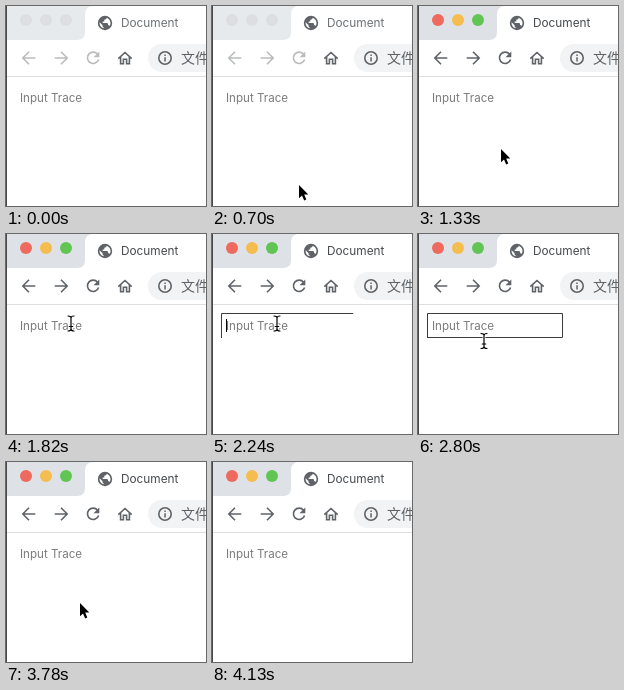
An HTML page that plays this animation: 200 by 200 pixels, repeating every 4550 ms.

```html
<!DOCTYPE html>
<html lang="en">
<head>
<meta charset="utf-8">
<title>Input Trace</title>
<style>
  html, body { margin: 0; width: 100%; height: 100%; overflow: hidden; background: #fff; }
  svg { display: block; width: 100vw; height: 100vh; }
  text { font-family: Inter, Roboto, "Liberation Sans", sans-serif; }
  .cjk { font-family: "Noto Sans CJK SC", "Noto Sans CJK", sans-serif; }
  svg { --strip: #dee1e6; --red: #ee6a5f; --yellow: #f5bd4f; --green: #61c554; --icon: #5f6368; --title: #45494d; }
  svg.idle { --strip: #e7eaed; --red: #dcdee1; --yellow: #dcdee1; --green: #dcdee1; --icon: #babcbe; --title: #6c7074; }
  .line { fill: none; stroke: var(--icon); stroke-width: 1.6; }
  .dark { fill: none; stroke: #5f6368; stroke-width: 1.6; }
</style>
</head>
<body>
<svg id="stage" class="idle" viewBox="0 0 200 200">
  <rect width="200" height="200" fill="#fff"/>

  <!-- tab strip -->
  <path d="M0 0H85Q79 2 79 8V26Q79 34 71 34H0Z" fill="var(--strip)"/>
  <circle cx="20" cy="14" r="6" fill="var(--red)"/>
  <circle cx="40" cy="14" r="6" fill="var(--yellow)"/>
  <circle cx="60" cy="14" r="6" fill="var(--green)"/>
  <circle cx="99" cy="17" r="7.2" fill="#5f6368"/>
  <path d="M93.6 16.3L96.6 19.2V20.6L98.3 22.3C95.400 22.200 93.300 19.600 93.600 16.300ZM100.600 11.800C100.600 13.400 99.500 13.700 98.300 13.800V15.400H96.700V17H101.200Q102.200 17.200 102.200 19.300H103.300L103.600 20.200C105.500 17.400 104.400 13.300 100.600 11.800Z" fill="#fff"/>
  <text x="115" y="21" font-size="11.8" fill="var(--title)">Document</text>

  <!-- toolbar -->
  <path class="line" d="M29.300 52H17M23 45.800L16.800 52L23 58.200"/>
  <path class="line" d="M48.700 52H61M55 45.800L61.200 52L55 58.200"/>
  <path class="line" d="M91.600 48.200A5.700 5.700 0 1 0 92.600 53.500"/>
  <path d="M93.300 45.500V51.300H87.500Z" fill="var(--icon)"/>
  <path class="dark" d="M112.300 52.600L119 46.500L125.700 52.600M114.600 51V57.700H117.400V53.300H120.600V57.700H123.400V51"/>
  <rect x="142" y="38" width="90" height="28" rx="14" fill="#f1f3f4"/>
  <circle class="dark" cx="159" cy="52" r="6.200" stroke-width="1.400"/>
  <path d="M158.300 48.500H159.800V50H158.300ZM158.300 51.300H159.800V55.500H158.300Z" fill="#5f6368"/>
  <text class="cjk" x="175" y="57.200" font-size="14" fill="#5f6368">文件</text>
  <rect y="70" width="200" height="1" fill="#dcdee1"/>

  <!-- page -->
  <text x="14" y="96" font-size="11.6" fill="#7b7b7b">Input Trace</text>
  <rect id="caret" x="14" y="85" width="1" height="13" fill="#000"/>
  <path id="trace" d="M9.500 104V79.500H144.500V103.500H10" fill="none" stroke="#3c3c3c"/>
  <rect width="1" height="200" fill="#4a4a4a"/>

  <circle id="ring" fill="none" stroke="#000" stroke-width="1.500"/>
  <path id="arrow" d="M0 0V13.200L3 10.400L5.200 15.400L7.300 14.500L5.200 9.600H9.300Z" fill="#000" stroke="#fff" stroke-width="1.800" stroke-linejoin="round" paint-order="stroke"/>
  <g id="beam" fill="none" stroke-linecap="round">
    <path d="M-3 -7.500Q0 -7.500 0 -5.500Q0 -7.500 3 -7.500M0 -5.500V5.500M-3 7.500Q0 7.500 0 5.500Q0 7.500 3 7.500M-1.800 3H1.800" stroke="#fff" stroke-width="2.800"/>
    <path d="M-3 -7.500Q0 -7.500 0 -5.500Q0 -7.500 3 -7.500M0 -5.500V5.500M-3 7.500Q0 7.500 0 5.500Q0 7.500 3 7.500M-1.800 3H1.800" stroke="#000" stroke-width="1.200"/>
  </g>
</svg>
<script>
const LOOP = 4550, STEP = 70, SIDE_MS = 100;
const $ = id => document.getElementById(id);
const stage = $('stage'), trace = $('trace'), ring = $('ring');

// [time, pointer, x, y]
const moves = [
  [0, ''],
  [700, 'arrow', 87, 179], [770, 'arrow', 85, 165], [840, 'arrow', 84, 160],
  [1330, 'arrow', 83, 143], [1400, 'arrow', 80, 131], [1470, 'arrow', 77, 119],
  [1540, 'arrow', 73, 109], [1610, 'beam', 70, 101], [1680, 'beam', 67, 95],
  [1750, 'beam', 66, 91], [1820, 'beam', 65, 89.5],
  [2800, 'beam', 66, 107], [2870, 'arrow', 70, 124], [2940, 'arrow', 72, 135],
  [3780, 'arrow', 74, 141], [3850, 'arrow', 81, 158], [3920, 'arrow', 91, 181],
  [3990, 'arrow', 100, 198], [4130, '']
];
// [time, x, y, radius]
const clicks = [[910, 83.5, 159.5, 21.2], [2030, 65, 89.5, 16.7], [3010, 72, 134.8, 16.5]];
const sides = [24.5, 135, 24, 134.5];
const total = sides.reduce((a, b) => a + b);
trace.style.strokeDasharray = `${total} ${total + 10}`;

const clamp = v => Math.min(1, Math.max(0, v));
const bez = (a, b, u) => 3 * a * u * (1 - u) ** 2 + 3 * b * u * u * (1 - u) + u ** 3;

function ease(p) {
  if (p <= 0 || p >= 1) return clamp(p);
  let lo = 0, hi = 1;
  for (let i = 0; i < 20; i++) {
    const mid = (lo + hi) / 2;
    if (bez(0.25, 0.25, mid) < p) lo = mid; else hi = mid;
  }
  return bez(0.1, 1, lo);
}

// Sides grow one after another and retract in the opposite order.
function traced(t) {
  return sides.reduce((sum, len, i) => {
    const grow = ease((t - 2060 - i * SIDE_MS) / SIDE_MS);
    const shrink = ease((t - 3043 - (3 - i) * SIDE_MS) / SIDE_MS);
    return sum + len * (grow - shrink);
  }, 0);
}

const show = (el, on) => { el.style.display = on ? '' : 'none'; };

function draw(time) {
  const t = Math.floor((time % LOOP) / STEP + 1e-6) * STEP;
  stage.classList.toggle('idle', t < 980);

  const [, kind, x, y] = moves.filter(m => m[0] <= t).pop();
  for (const id of ['arrow', 'beam']) {
    show($(id), id === kind);
    if (id === kind) $(id).setAttribute('transform', `translate(${x} ${y})`);
  }

  const click = clicks.find(c => c[0] === t);
  show(ring, click);
  if (click) ['cx', 'cy', 'r'].forEach((k, i) => ring.setAttribute(k, click[i + 1]));

  show($('caret'), t >= 2100 && t < 2590);
  const len = traced(t);
  show(trace, len > 0.3);
  trace.style.strokeDashoffset = total - len;
}

const start = performance.now();
function tick() {
  draw(performance.now() - start);
  requestAnimationFrame(tick);
}
tick();
</script>
</body>
</html>
```
